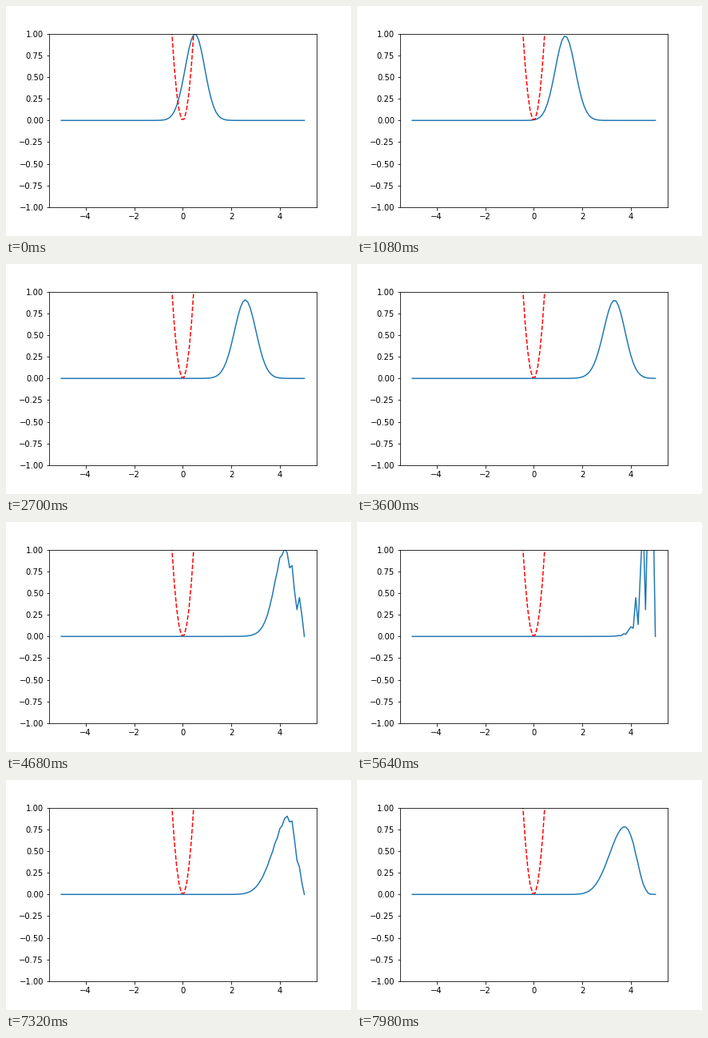
These frames come from a looping animation (432x288 px, 8 s). A matplotlib script:

```python
import numpy as np
import matplotlib.pyplot as plt
from matplotlib.animation import FuncAnimation

TICK_MS = 20          # timer interval
TICKS_PER_STEP = 3    # the wave advances every 60 ms
LOOP_MS = 8000
DT = 0.00502          # physical time per step

# Wave packet in a harmonic well, hard walls at both ends of the grid
N = 100
x = np.linspace(-5, 5, N)
dx = x[1] - x[0]
V = 5 * x**2

X0, SIGMA, K0 = 0.5, 0.4, 20.4
psi0 = np.exp(-(x - X0)**2 / (4 * SIGMA**2) + 1j * K0 * x)
psi0 /= np.sqrt(np.sum(np.abs(psi0)**2) * dx)

# Finite-difference Hamiltonian on the interior points
hop = np.full(N - 3, -0.5 / dx**2)
H = np.diag(1 / dx**2 + V[1:-1]) + np.diag(hop, 1) + np.diag(hop, -1)
energy, modes = np.linalg.eigh(H)
coeffs = modes.T @ psi0[1:-1]


def density(step):
    """Probability density after the given number of steps."""
    psi = modes @ (coeffs * np.exp(-1j * energy * DT * step))
    return np.pad(np.abs(psi)**2, 1)


fig, ax = plt.subplots(figsize=(6, 4), dpi=72)
fig.subplots_adjust(left=0.125, right=0.9, bottom=0.125, top=0.88)
wave, = ax.plot(x, density(0))
ax.plot(x, V, "r--")
ax.set_xlim(-5.5, 5.5)
ax.set_ylim(-1, 1)


def update(tick):
    wave.set_ydata(density(tick // TICKS_PER_STEP))
    return wave,


anim = FuncAnimation(fig, update, frames=LOOP_MS // TICK_MS,
                     interval=TICK_MS, repeat=True, repeat_delay=0)
plt.show()
```
